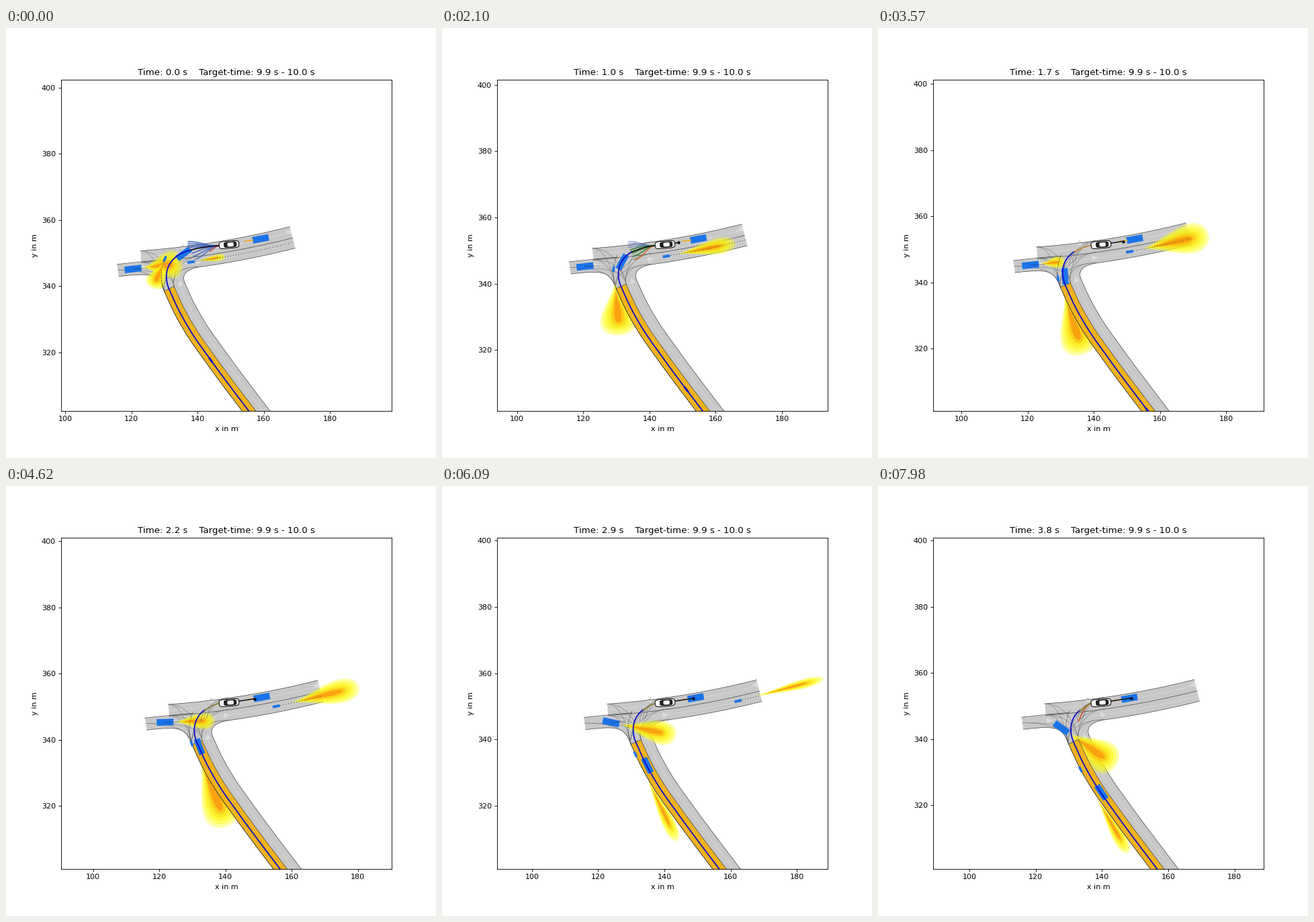
Recreate the animation shown at these times as a matplotlib script. Size 640 by 640 pixels, loop 8000 ms.

```python
from itertools import product

import numpy as np
import matplotlib.pyplot as plt
from matplotlib.animation import FuncAnimation
from matplotlib.patches import Polygon

LOOP, INTERVAL, STEP = 8000, 80, 210
BLUE, ROUTE_BLUE = "#1a73e8", "#0a0ac8"
GREY, PALE, DARK = "#c8c8c8", "#dcdcdc", "#3c3c3c"


# ---- geometry
def arc(path):
    return np.r_[0, np.cumsum(np.hypot(*np.diff(path, axis=0).T))]


def smooth(points, n=60):
    """Cubic Hermite curve through a few points."""
    points = np.array(points, float)
    knots = arc(points)
    slope = np.gradient(points, knots, axis=0)
    at = np.linspace(0, knots[-1], n)
    i = np.clip(np.searchsorted(knots, at, side="right") - 1, 0, len(knots) - 2)
    h = (knots[i + 1] - knots[i])[:, None]
    u = (at - knots[i])[:, None] / h
    return ((2*u**3 - 3*u**2 + 1) * points[i] + (u**3 - 2*u**2 + u) * h * slope[i]
            + (3*u**2 - 2*u**3) * points[i + 1] + (u**3 - u**2) * h * slope[i + 1])


def bezier(a, b, c, d, n=30):
    u = np.linspace(0, 1, n)[:, None]
    a, b, c, d = (np.array(p, float) for p in (a, b, c, d))
    return (1-u)**3*a + 3*u*(1-u)**2*b + 3*u*u*(1-u)*c + u**3*d


def offset(path, distance):
    """Parallel curve, positive to the left of travel."""
    tx, ty = np.gradient(path, axis=0).T
    return path + distance * np.c_[-ty, tx] / np.hypot(tx, ty)[:, None]


def along(path, distance):
    """Position and heading after a travelled distance."""
    def at(s):
        return np.array([np.interp(s, arc(path), column) for column in path.T])
    dx, dy = at(distance + .5) - at(distance - .5)
    return *at(distance), np.degrees(np.arctan2(dy, dx))


def place(shape, x, y, degrees):
    c, s = np.cos(np.radians(degrees)), np.sin(np.radians(degrees))
    return shape @ np.array([[c, s], [-s, c]]) + (x, y)


def box(length, width):
    return np.array([(-1, -1), (1, -1), (1, 1), (-1, 1)]) * (length / 2, width / 2)


def rounded(length, width, shift=0.0):
    a = np.linspace(0, 2 * np.pi, 40)
    c, s = np.cos(a), np.sin(a)
    return np.c_[np.sign(c) * abs(c)**.45 * length / 2 + shift,
                 np.sign(s) * abs(s)**.45 * width / 2]


# ---- road map, in metres
east = np.linspace(123, 168.7, 60)
DIVIDER = np.c_[east, 347.2 + .07 * (east - 123) + .002 * (east - 123)**2]
TOP, BOTTOM = offset(DIVIDER, 3.5), offset(DIVIDER, -3.2)
BOTTOM = BOTTOM[BOTTOM[:, 0] > 141]
LANE_R = smooth([(132.9, 339.9), (135.9, 333.4), (140, 326.3), (145, 319.2), (162, 296.5)])
LANE_L, SIDE = offset(LANE_R, -3.3), offset(LANE_R, 3.4)
FILLET = bezier(BOTTOM[0], (137, 345.3), (135.2, 343.8), SIDE[0])
CORNER = bezier(LANE_L[0], (127.8, 343.7), (126.4, 344.1), (116.2, 342.95))
ARM_TOP = bezier((115.7, 346.6), (120, 347.1), (125, 347.6), (130, 348))
ROUTE = np.vstack([bezier((138, 350.9), (131.6, 349.5), (129.2, 344.5),
                          offset(LANE_R, -1.7)[0]), offset(LANE_R, -1.7)[1:]])
BIKE_PATH = offset(DIVIDER, -1.4)
WALK_PATH = np.vstack([bezier((130.2, 348.4), (128.9, 345.5), (128.6, 342), LANE_L[0]),
                       LANE_L[1:]])
ARM_PATH = bezier((120.5, 345.2), (123.5, 345.6), (126.5, 345.2), (131, 340.5))
TURN_PATH = smooth([(135.8, 349.8), (131.7, 346.5), (131.3, 341.8), (134.9, 332.1),
                    (139.9, 323.8), (144, 318)])
ONCOMING_PATH = np.array([(159.05, 354.3), (147, 352.1)])

VEHICLES = {   # path, distance after t seconds, length, width
    "oncoming": (ONCOMING_PATH, lambda t: 4.9 * t - .53 * t * t, 4.9, 2),
    "arm": (ARM_PATH, lambda t: 1.05 * max(0, t - 1.1)**2, 5.1, 2),
    "turning": (TURN_PATH, lambda t: 4.3 * t + .95 * t * t, 4.9, 1.9),
    "bike": (BIKE_PATH, lambda t: 15 + 6.4 * t + .72 * t * t, 2.2, .8),
    "walker": (WALK_PATH, lambda t: .2 + 3.7 * t + .3 * t * t, 1.8, .7),
}

fig = plt.figure(figsize=(8, 8), dpi=80)
ax = fig.add_subplot(111)
ax.set_aspect("equal")
ax.set_xlabel("x in m")
ax.set_ylabel("y in m")
moving = []


def fill(points, color, z, **style):
    return ax.add_patch(Polygon(points, closed=True, facecolor=color, zorder=z, **style))


def stroke(points, color, width, z, **style):
    points = np.asarray(points)
    return ax.plot(points[:, 0], points[:, 1], color=color, lw=width, zorder=z, **style)[0]


def draw_map():
    fill(np.vstack([TOP, BOTTOM[::-1], FILLET, SIDE, LANE_L[::-1], CORNER,
                    ARM_TOP[0], DIVIDER[0]]), GREY, 1)
    for edge in (TOP, BOTTOM, FILLET, SIDE, CORNER, ARM_TOP, DIVIDER):
        stroke(edge, DARK, .6, 3)
    entries = (DIVIDER[0], TOP[0], (116, 344.9), DIVIDER[24], TOP[24], FILLET[0])
    for a, b in product(entries, (LANE_R[0], LANE_L[0])):
        bend = b[0] + .4 * (a[0] - b[0])
        stroke(bezier(a, (bend, a[1]), (b[0] - .8, b[1] + 4.5), b), "#777777", .5, 3)
    for middle in (offset(DIVIDER, 1.75), offset(DIVIDER, -1.6), offset(LANE_R, 1.7)):
        stroke(middle, PALE, .6, 2)
    for x, y, turn in ((167.3, 356.4, 190), (124.2, 345.6, 5), (140.4, 347.4, 8),
                       (134.7, 341, 100), (135.2, 351.8, 190)):
        fill(place(np.array([(-.9, -.9), (.9, 0), (-.9, .9)]), x, y, turn), PALE, 2)
    fill(np.vstack([LANE_L, LANE_R[::-1]]), "#f3b114", 5, alpha=.95)
    for edge in (LANE_L, LANE_R, [LANE_L[0], LANE_R[0]]):
        stroke(edge, DARK, .6, 6)
    stroke(WALK_PATH, "black", .9, 6, ls=(0, (1, 2)))


# ---- moving parts
def cloud(x, y, angle, near, reach, width):
    """Nested drops ahead of a vehicle, pale outside and orange inside."""
    length = reach - near
    s = (1 - np.cos(np.linspace(0, np.pi, 36))) / 2
    profile = s**1.5 * (1 - s)**.5 / .3248
    for level in np.linspace(0, 1, 6):
        distance = near + (.15 * level + s * (1 - .39 * level)) * length
        half = width / 2 * (1 - .8 * level) * profile
        drop = np.vstack([np.c_[distance, half], np.c_[distance, -half][::-1]])
        color = (1 - .02 * level, 1 - .5 * level**2.5, .05)
        yield fill(place(drop, x, y, angle), color, 4, lw=0, alpha=.36 + .2 * level)


def clouds(t, pose):
    if "bike" in pose:
        x, y, angle = pose["bike"]
        bulge = np.exp(-((t - 1.75) / .8)**2)
        yield from cloud(x, y, angle + 2, 2 + t, 10.5 + 17 * (1 - np.exp(-t)), 2 + 7 * bulge)
    if t < .3:
        yield from cloud(*pose["arm"], 2.8, 15, 8.5)
    elif t > 1.2:
        late = t - 1.7
        yield from cloud(*pose["arm"], 2.8, min(20, 10.4 + 9.2 * late), 3.6 + 3 * late)
    x, y, _ = pose["walker"]
    ahead_x, ahead_y, _ = along(WALK_PATH, VEHICLES["walker"][1](t) + 5)
    angle = np.degrees(np.arctan2(ahead_y - y, ahead_x - x))
    if t < .3:
        yield from cloud(x, y, angle - 10, 1, 9.5, 6)
    else:
        yield from cloud(x, y, angle, 2 + 2 * t, min(14 + 6 * t, 29), 11 if t < 2.5 else 4)
    if .2 < t < .8:
        yield from cloud(x, y, angle - 15, 1, 12.5, 9.6)


def ego_car(x, y):
    for shape, color, edge in ((rounded(6, 2.2), "white", "black"),
                               (rounded(3.9, 1.8, .35), "#222222", "none"),
                               (rounded(1.9, 1.2, .45), "white", "none")):
        yield fill(place(shape, x, y, 5), color, 14, edgecolor=edge, lw=.9)


def plans(t, front, start):
    """Planned paths that fan out ahead of the car."""
    def path(end, color, width, pull, lift, alpha=.8):
        bend = (front[0] + .4 * (end[0] - front[0]), front[1] - .2)
        return stroke(bezier(front, bend, end + (pull, lift), end), color, width, 9, alpha=alpha)

    reach = 9.3 - 1.2 * t
    if t < 1.4:
        for rise in np.linspace(1.2, -.5, 4):
            yield path(front + (-reach, rise), "#4a68c0", 1.7 - .8 * t, 3, .3)
        for fall in np.linspace(1.3, 4.2, 4):
            color = "#4a68c0" if t < .3 else "#2a7a28" if fall < 4 else "#c86418"
            yield path(front + (.5 * fall - reach, -fall), color, 1.7, 3, 1.1)
        if t < .7:
            yield path(front + (-2.8, -1.7), "#cc2210", 1.3, 1, .5)
    else:
        for shift in (0, .9, 1.8):
            yield path(np.array([132.6 + shift, 345.6 + shift / 2]), "#777777", .7, .4, 4)
    if t > 3.2:
        yield path(np.array([132.9, 345.4]), "#d8501a", 1.7, .8, 2)
    link = "black" if t < 1.4 else "#d08a20" if t < 2.1 else "#8a8420"
    yield path(start, link, 1.3, 1.5, .5, 1)


def draw(index):
    t = (index * INTERVAL + 70) // STEP / 10
    while moving:
        moving.pop().remove()

    # constant speed that settles into a stop
    driven = 5 * t / (1 + (5 * t / 10.3)**3)**(1 / 3)
    view = np.array([148.7 - driven, 352.4 - .157 * driven])
    ax.set_xlim(view[0] - 50, view[0] + 50)
    ax.set_ylim(view[1] - 50, view[1] + 50)
    ax.set_title(f"Time: {t:.1f} s    Target-time: 9.9 s - 10.0 s")

    pose = {name: along(path, travel(t)) for name, (path, travel, *_) in VEHICLES.items()}
    if pose["bike"][0] > 168:
        del pose["bike"]
    moving.extend(clouds(t, pose))
    for name, spot in pose.items():
        moving.append(fill(place(box(*VEHICLES[name][2:]), *spot), BLUE, 7))

    if "bike" in pose:
        ahead = BIKE_PATH[BIKE_PATH[:, 0] > pose["bike"][0]]
        moving.append(stroke(ahead, "#222222", .9, 6, ls=(0, (1, 3))))
    arm = np.array(pose["arm"][:2])
    if t < 3.2:
        moving.append(stroke([arm, arm + (4.4, .2)], "#222222", .9, 8, ls=(0, (1, 1.5))))
    oncoming = np.array(pose["oncoming"][:2])
    moving.append(stroke([oncoming - (4.8, .75), oncoming - (2.3, .36)], "#f0a818", 1.5, 7))

    ego = view + (.8, .15)
    if t > .5:
        moving.append(stroke([ego, (148.8, 352.4)], "#101020", 1.4, 10,
                             marker="o", ms=3, markevery=[1]))
    route = ROUTE[arc(ROUTE) >= 5 * (1 - np.exp(-t))]
    moving.append(stroke(route, ROUTE_BLUE, 1.6, 8))
    moving.append(fill(place(box(1.8, .6), *along(ROUTE, 40.7 + 12 * t)), ROUTE_BLUE, 8))
    moving.extend(plans(t, ego + (-3, -.3), route[0]))
    moving.extend(ego_car(*ego))


draw_map()
animation = FuncAnimation(fig, draw, frames=LOOP // INTERVAL, interval=INTERVAL,
                          init_func=lambda: None, repeat=True, repeat_delay=0)
plt.show()
```
